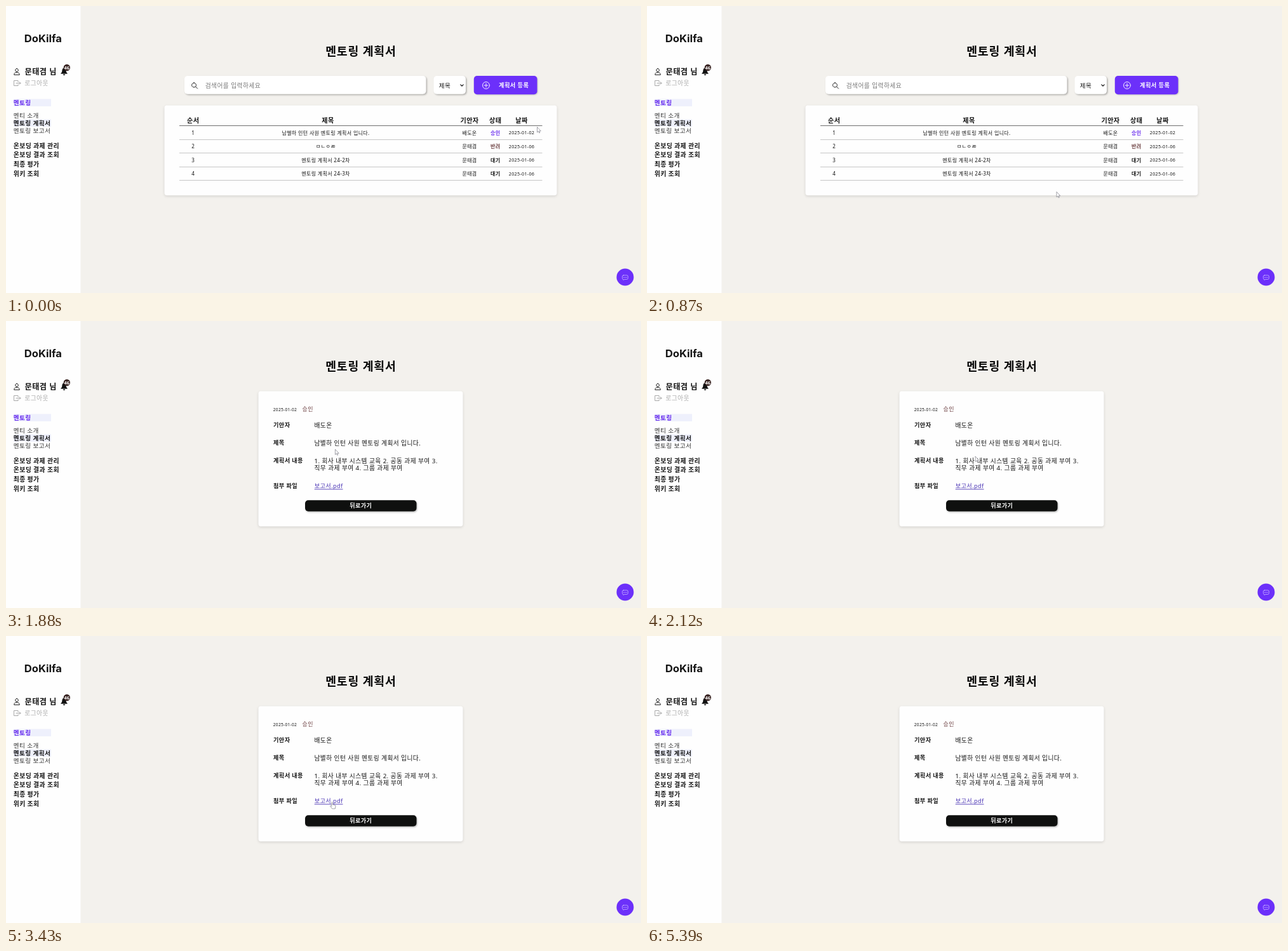
Write an HTML page with a canvas that moves like this. It is 1000 px wide and 452 px high and loops after 5.41 s.

```html
<!DOCTYPE html>
<html lang="ko">
<head>
<meta charset="utf-8">
<title>멘토링 계획서</title>
<style>
  html, body { margin: 0; width: 100%; height: 100%; overflow: hidden; background: #f3f1ed; }
  canvas { display: block; width: 1000px; height: 452px; }
</style>
</head>
<body>
<canvas id="stage"></canvas>
<script>
const W = 1000, H = 452, LOOP = 5410, PAGE_SWITCH = 1850;
const FONT = '"Noto Sans", "Noto Sans CJK KR", "Noto Sans CJK", sans-serif';
const PURPLE = '#6c30fa', INK = '#151515', BROWN = '#6d4042';
const USER = '문태겸', AUTHOR = '배도온';
const PLAN = '남별하 인턴 사원 멘토링 계획서 입니다.';

const canvas = document.getElementById('stage');
const ctx = canvas.getContext('2d');
const dpr = window.devicePixelRatio || 1;
canvas.width = W * dpr;
canvas.height = H * dpr;
ctx.scale(dpr, dpr);

// y is the visual middle of the line; body text is slightly tracked out
function text(str, x, y, size, { bold = false, color = INK, align = 'left', font = FONT } = {}) {
  const tracked = font === FONT;
  const px = tracked ? size * 0.955 : size;
  ctx.font = `${bold ? 700 : 400} ${px}px ${font}`;
  ctx.letterSpacing = tracked ? `${px * 0.043}px` : '0px';
  ctx.fillStyle = color;
  ctx.textAlign = align;
  ctx.fillText(str, x, y + size * 0.36);
}

function box(x, y, w, h, r, fill, shadow) {
  ctx.save();
  if (shadow) {
    const [dx, dy, blur, alpha] = shadow;
    ctx.shadowOffsetX = dx * dpr;
    ctx.shadowOffsetY = dy * dpr;
    ctx.shadowBlur = blur * dpr;
    ctx.shadowColor = `rgba(0,0,0,${alpha})`;
  }
  ctx.fillStyle = fill;
  ctx.beginPath();
  ctx.roundRect(x, y, w, h, r);
  ctx.fill();
  ctx.restore();
}

function disc(x, y, r, fill) {
  ctx.fillStyle = fill;
  ctx.beginPath();
  ctx.arc(x, y, r, 0, Math.PI * 2);
  ctx.fill();
}

function icon(x, y, d, { stroke, fill, width = 1 }) {
  const path = new Path2D(d);
  ctx.save();
  ctx.translate(x, y);
  ctx.lineJoin = ctx.lineCap = 'round';
  if (fill) { ctx.fillStyle = fill; ctx.fill(path); }
  if (stroke) { ctx.strokeStyle = stroke; ctx.lineWidth = width; ctx.stroke(path); }
  ctx.restore();
}

function rule(y, color) {
  ctx.fillStyle = color;
  ctx.fillRect(273, y, 571.5, 1);
}

function sidebar() {
  ctx.fillStyle = '#fefefe';
  ctx.fillRect(0, 0, 117.5, H);
  text('DoKilfa', 58.3, 51, 16.6, { bold: true, align: 'center', font: 'Inter, sans-serif' });

  icon(12, 98, 'M5 .5a2.3 2.5 0 1 0 .01 0ZM.7 10c0-5 8.6-5 8.6 0Z', { stroke: '#222' });
  text(USER + ' 님', 29.5, 103, 12.7, { bold: true });
  icon(86, 97, 'M5.5 .5C2 1 2.6 5 2 7L0 9.7h11L9 7C8.5 5 9 1 5.5 .5ZM3.8 10.5h3.4a1.7 1.7 0 0 1-3.4 0Z', { fill: '#111' });
  disc(95.8, 97, 5.2, '#3a2523');
  text('46', 95.8, 97, 7.5, { bold: true, color: '#fff', align: 'center' });

  icon(12, 117, 'M7 2.5V.5H.5v8H7V6.5M4 4.5h7M9 2.5l2 2-2 2', { stroke: '#aaa' });
  text('로그아웃', 29.3, 121, 10.2, { color: '#aaa' });

  ctx.fillStyle = '#eef0fc';
  ctx.fillRect(12, 146.5, 59, 11.5);
  ctx.fillRect(12, 178.5, 59, 11.5);
  text('멘토링', 11.7, 152.3, 10.1, { bold: true, color: '#6428ee' });
  text('멘티 소개', 11.7, 172.3, 10.1, { color: '#333' });
  text('멘토링 계획서', 11.7, 184, 10.1, { bold: true });
  text('멘토링 보고서', 11.7, 196, 10.1, { color: '#333' });
  [['온보딩 과제 관리', 220], ['온보딩 결과 조회', 234.7], ['최종 평가', 249], ['위키 조회', 264.7]]
    .forEach(([label, y]) => text(label, 11.7, y, 10.3, { bold: true }));
}

function chatButton() {
  disc(975, 427, 13.5, PURPLE);
  icon(970, 423.5, 'M2.5 .5h5a2 2 0 0 1 2 2v2.5a2 2 0 0 1-2 2H4L2 8V7A2 2 0 0 1 .5 5V2.5a2 2 0 0 1 2-2Z', { stroke: '#d5c4ff', width: 0.7 });
  [972.8, 975, 977.2].forEach(x => disc(x, 427.3, 0.6, '#e9e0ff'));
}

function listPage() {
  const soft = [1.5, 1.5, 2.5, 0.28];
  box(281, 110, 380.5, 28.7, 5, '#fff', soft);
  icon(292, 120.5, 'M4 .5a3.5 3.5 0 1 0 .01 0ZM6.6 6.6l3 3', { stroke: '#222' });
  text('검색어를 입력하세요', 313.7, 125, 10.2, { color: '#777' });
  box(673.5, 110, 50.5, 28.7, 5, '#fff', soft);
  text('제목', 681.7, 125, 10);
  icon(715.8, 123.8, 'M0 0l2.2 2.2L4.4 0', { stroke: '#111', width: 1.2 });
  box(736.8, 110, 99.7, 29.3, 5, PURPLE, [1, 1, 2, 0.18]);
  icon(756, 125, 'M5.5 0a5.5 5.5 0 1 1-11 0a5.5 5.5 0 1 1 11 0ZM-3 0h6M0-3v6', { stroke: '#fff', width: 0.9 });
  text('계획서 등록', 776, 125, 9.7, { bold: true, color: '#fff' });

  box(249.5, 156.5, 618, 141.7, 4, '#fefefe', [0, 1.5, 4, 0.13]);
  const cols = [294.7, 503.5, 730, 770.7, 812];
  ['순서', '제목', '기안자', '상태', '날짜'].forEach((s, i) =>
    text(s, i === 1 ? 507 : cols[i], 180, 10.6, { bold: true, align: 'center' }));
  rule(188, '#707070');

  const rows = [
    [PLAN, AUTHOR, '승인', '02', '#6c30ee'],
    ['ㅁㄴㅇㄻ', USER, '반려', '06', BROWN],
    ['멘토링 계획서 24-2차', USER, '대기', '06', INK],
    ['멘토링 계획서 24-3차', USER, '대기', '06', INK],
  ];
  rows.forEach(([title, author, state, day, color], i) => {
    const y = 199.5 + i * 21.5;
    const cells = [i + 1, title, author, state, '2025-01-' + day];
    cells.forEach((s, c) => text(s, cols[c], y, c === 4 ? 7.5 : 8.4,
      { align: 'center', bold: c === 3, color: c === 3 ? color : INK }));
    rule(Math.round(y + 10.3), '#c6c6c6');
  });
}

function detailPage() {
  box(397.5, 110.5, 322, 213, 4, '#fefefe', [0, 1.5, 4, 0.13]);
  text('2025-01-02', 420.8, 139.3, 6.9);
  text('승인', 466.5, 139, 9.4, { color: BROWN });
  [['기안자', 163.5], ['제목', 191.7], ['계획서 내용', 219.8], ['첨부 파일', 259.5]]
    .forEach(([s, y]) => text(s, 421, y, 9.6, { bold: true }));
  [[AUTHOR, 164], [PLAN, 192], ['1. 회사 내부 시스템 교육 2. 공동 과제 부여 3.', 220.3], ['직무 과제 부여 4. 그룹 과제 부여', 231.3]]
    .forEach(([s, y]) => text(s, 485.5, y, 10.2));
  text('보고서.pdf', 485.7, 260, 9.6, { color: '#4a34b4' });
  ctx.fillRect(485.7, 264.5, 44.8, 0.9);
  box(471, 282.3, 175.5, 17.5, 5, '#0f100f', [1, 1.5, 2.5, 0.28]);
  text('뒤로가기', 558.7, 291, 9.5, { bold: true, color: '#fff', align: 'center' });
}

// start, end, target x, target y
const moves = [
  [120, 440, 715, 282],
  [620, 870, 645, 293],
  [970, 1080, 600, 268],
  [1180, 1480, 518.5, 202],
  [1850, 2120, 517, 213.5],
  [2290, 2550, 516, 236],
  [2690, 2950, 515.5, 252],
  [3320, 3430, 513.5, 261.5],
];

function pointerAt(t) {
  let x = 836.5, y = 191;
  for (const [t0, t1, tx, ty] of moves) {
    if (t < t0) break;
    const p = Math.min(1, (t - t0) / (t1 - t0));
    const k = p * p * (3 - 2 * p);
    x += (tx - x) * k;
    y += (ty - y) * k;
  }
  return [x, y];
}

function pointer(t) {
  if (t >= 5390) return;
  const [x, y] = pointerAt(t);
  const hand = (t >= 1400 && t < PAGE_SWITCH) || t >= 3380;
  const shape = hand
    ? 'M-.9 .8C-.9-.3 .9-.3 .9 .8V4L4.5 4.8Q5.6 5.2 5.5 6.5L4.8 10.5H.2L-2.8 6.8C-3.3 5.8-2 5.3-.9 6.7Z'
    : 'M0 0V8L1.9 6.3L3.2 9L4.4 8.4L3.1 5.9H5.4Z';
  icon(x, y, shape, { fill: '#fff', stroke: '#7c7c86', width: 0.7 });
}

function draw(now) {
  const t = now % LOOP;
  ctx.fillStyle = '#f3f1ed';
  ctx.fillRect(0, 0, W, H);
  sidebar();
  text('멘토링 계획서', 558.9, 71.5, 19.2, { bold: true, color: '#080808', align: 'center' });
  (t < PAGE_SWITCH ? listPage : detailPage)();
  chatButton();
  pointer(t);
}

const start = performance.now();
function frame() {
  draw(performance.now() - start);
  requestAnimationFrame(frame);
}
frame();
</script>
</body>
</html>
```
